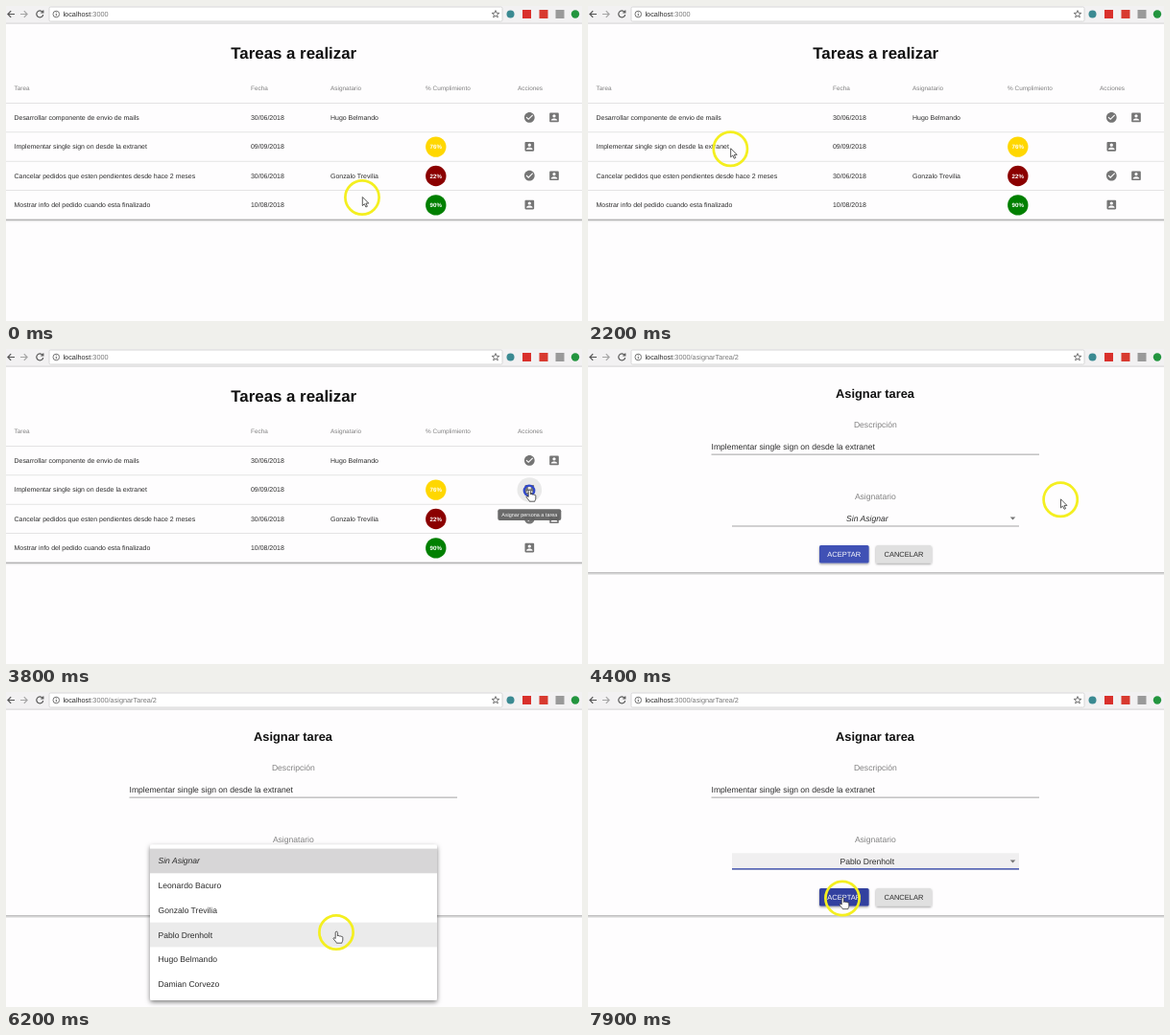
These frames come from a looping animation (600x329 px, 8000 ms). An HTML page:

```html
<!DOCTYPE html>
<html lang="es">
<head>
<meta charset="utf-8">
<title>Tareas</title>
<style>
html, body { margin: 0; width: 100%; height: 100%; overflow: hidden; background: #fefdfe; }
svg { display: block; }
text { font-family: "Liberation Sans", Arial, sans-serif; text-rendering: geometricPrecision; }
</style>
</head>
<body>
<svg id="stage" width="600" height="329" viewBox="0 0 600 329"></svg>
<script>
const LOOP = 8000;
const INDIGO = "#3f51b5";
const people = ["Leonardo Bacuro", "Gonzalo Trevilia", "Pablo Drenholt", "Hugo Belmando", "Damian Corvezo"];
const tasks = [
  { name: "Desarrollar componente de envio de mails", date: "30/06/2018", who: people[3] },
  { name: "Implementar single sign on desde la extranet", date: "09/09/2018", done: 76, color: "#ffd700" },
  { name: "Cancelar pedidos que esten pendientes desde hace 2 meses", date: "30/06/2018", who: people[1], done: 22, color: "#8b0000" },
  { name: "Mostrar info del pedido cuando esta finalizado", date: "10/08/2018", done: 90, color: "#008000" }
];

const text = (x, y, size, str, attrs = "") =>
  `<text x="${x}" y="${y}" font-size="${size}" fill="#2b2b2b" ${attrs}>${str}</text>`;
const middle = 'text-anchor="middle"';
const rect = (x, y, w, h, fill, attrs = "") =>
  `<rect x="${x}" y="${y}" width="${w}" height="${h}" fill="${fill}" ${attrs}/>`;
const circle = (x, y, r, fill, attrs = "") =>
  `<circle cx="${x}" cy="${y}" r="${r}" fill="${fill}" ${attrs}/>`;
const icon = (id, x, y) =>
  `<use href="#${id}" transform="translate(${x - 6.43} ${y - 6.43}) scale(.536)" fill="#757575"/>`;
const paperEdge = y => rect(0, y, 600, 1.5, "#b4b4b4") + rect(0, y + 1.5, 600, 1.2, "#e6e6e6");

const defs = `<defs>
  <filter id="shadow" x="-20%" y="-20%" width="140%" height="150%">
    <feDropShadow dx="0" dy="1.2" stdDeviation="1.1" flood-opacity=".4"/>
  </filter>
  <filter id="lift" x="-10%" y="-10%" width="120%" height="125%">
    <feDropShadow dx="0" dy="2" stdDeviation="2.4" flood-opacity=".5"/>
  </filter>
  <path id="check" d="M12 2C6.48 2 2 6.48 2 12s4.48 10 10 10 10-4.48 10-10S17.52 2 12 2zm-2 15l-5-5 1.41-1.41L10 14.17l7.59-7.59L19 8l-9 9z"/>
  <path id="person" d="M3 5v14c0 1.1.89 2 2 2h14c1.1 0 2-.9 2-2V5c0-1.1-.9-2-2-2H5c-1.11 0-2 .9-2 2zm12 4c0 1.66-1.34 3-3 3s-3-1.34-3-3 1.34-3 3-3 3 1.34 3 3zm-9 8c0-2 4-3.1 6-3.1s6 1.1 6 3.1v1H6v-1z"/>
</defs>`;

const star = Array.from({ length: 10 }, (_, i) => {
  const r = i % 2 ? 1.7 : 4, a = i * Math.PI / 5;
  return `${510 + r * Math.sin(a)},${8.6 - r * Math.cos(a)}`;
}).join(" ");

const browserBar = rect(0, 0, 600, 18, "#f2f1f2") + rect(0, 17.6, 600, 1, "#d3d2d3") +
  rect(45, 1, 472, 15, "#fff", 'rx="1.5" stroke="#cfcfcf" stroke-width=".8"') +
  `<g fill="none" stroke="#555" stroke-width="1.2">
    <path d="M9 8.5H2M5.2 5.2L1.9 8.5l3.3 3.3"/>
    <path d="M15 8.5h7M18.8 5.2l3.3 3.3-3.3 3.3" stroke="#a5a5a5"/>
    <path d="M38 6.2A3.5 3.5 0 1 0 38.7 9.2M38.8 4.4V7H36.2"/>
    <circle cx="52.3" cy="8.5" r="3.3" stroke-width=".8"/>
    <path d="M52.3 8v2.3M52.3 6.3v.9" stroke-width=".9"/>
    <polygon points="${star}" stroke-width=".8"/>
  </g>` +
  text(59.5, 11, 7.3, '<tspan>localhost</tspan><tspan fill="#777" id="path"></tspan>') +
  circle(525.5, 8.5, 4, "#3b8a92") + rect(538, 4, 9, 9, "#d9302c") + rect(555.5, 4, 9, 9, "#d83a30") +
  rect(572.5, 4, 9, 9, "#9a9a9a") + circle(593, 8.5, 4.2, "#23953f");

const columns = [[8.5, "Tarea"], [255, "Fecha"], [338, "Asignatario"], [437, "% Cumplimiento"], [533, "Acciones"]];

function taskRow(task, i) {
  const y = 116.4 + 30.4 * i;
  let out = rect(0, y - 15.4, 600, .8, "#dedede") +
    text(8.5, y + 2.3, 6.96, task.name) + text(255, y + 2.3, 6.96, task.date);
  if (task.who) out += text(338, y + 2.3, 6.96, task.who) + icon("check", 545.3, y) + icon("person", 571, y);
  else out += icon("person", 545.3, y);
  if (task.done) out += circle(447.8, y + .3, 10.7, task.color) +
    text(447.8, y + 2.4, 6.2, task.done + "%", middle + ' font-weight="bold" style="fill:#fff"');
  return out;
}

const listPage = `<g id="list">` +
  text(299.7, 55, 16.85, "Tareas a realizar", middle + ' font-weight="bold" style="fill:#111"') +
  columns.map(([x, label]) => text(x, 88.2, 6.43, label, 'style="fill:#808080"')).join("") +
  circle(545.3, 147, 12.8, "#e9e9e9", 'id="halo"') +
  tasks.map(taskRow).join("") + paperEdge(222.6) +
  `<g id="tip">` + rect(512.3, 167.2, 66, 11.8, "#616161", 'rx="2" opacity=".94"') +
  text(545.3, 175, 5.45, "Asignar persona a tarea", middle + ' style="fill:#fff"') + `</g></g>`;

const button = (id, x, w, fill, color, label) =>
  rect(x, 205, w, 18.6, fill, `id="${id}" rx="1.6" filter="url(#shadow)"`) +
  text(x + w / 2, 216.6, 7.5, label, `${middle} style="fill:${color}"`);

const itemTop = i => 163.6 + 25.7 * i;
const menu = `<g id="menu">` +
  rect(150, 159.5, 299, 162.5, "#fff", 'rx="2" filter="url(#lift)"') +
  rect(150, itemTop(0), 299, 25.7, "#d7d6d7") + rect(150, 0, 299, 25.7, "#ebebeb", 'id="hover"') +
  ["Sin Asignar", ...people].map((name, i) =>
    text(158.5, itemTop(i) + 15.8, 8.57, name, i ? "" : 'font-style="italic"')).join("") + `</g>`;

const formPage = `<g id="form">` +
  text(299, 51, 12.83, "Asignar tarea", middle + ' font-weight="bold" style="fill:#111"') +
  text(299.3, 81.8, 8.57, "Descripción", middle + ' style="fill:#808080"') +
  text(128.5, 104.6, 8.57, tasks[1].name) + rect(128.5, 109.7, 341.5, .8, "#8d8d8d") +
  text(299.3, 156.7, 8.57, "Asignatario", middle + ' style="fill:#808080"') +
  rect(150, 168.3, 299, 16.8, "#f0eff0", 'id="field"') + rect(150, 184.6, 299, .8, "#8d8d8d") +
  rect(0, 184.2, 0, 1.3, INDIGO, 'id="underline"') +
  text(290.8, 179.5, 8.57, "", middle + ' id="value"') +
  `<path d="M439.7 175.6h5.6l-2.8 2.8z" fill="#757575"/>` +
  button("accept", 241, 51.6, INDIGO, "#fff", "ACEPTAR") +
  button("cancel", 300, 57.8, "#e0e0e0", "#2b2b2b", "CANCELAR") +
  paperEdge(233.2) + menu + `</g>`;

const pointer = `<g id="pointer"><circle id="ring" fill="none"/>
  <g fill="#fff" stroke="#333" stroke-width=".8" stroke-linejoin="round">
    <path id="arrow" d="M.3-.5V8.6L2.4 6.7 3.9 10 5.4 9.3 3.9 6.1H6.8z"/>
    <path id="hand" transform="translate(.3 -.6)" d="M-1.1 7.2V.9a1.1 1.1 0 0 1 2.2 0V4.6a1 1 0 0 1 1.9.2a1 1 0 0 1 1.8.4a1 1 0 0 1 1.7.7V8.6c0 1.6-.9 1.8-.9 3.2H0C0 10.6-2.8 8.6-3.2 7.3c-.3-1 .9-1.5 2.1-.1z"/>
  </g></g>`;

document.getElementById("stage").innerHTML =
  defs + rect(0, 0, 600, 329, "#fefdfe") + listPage + formPage + browserBar + pointer;

const el = {};
document.querySelectorAll("[id]").forEach(node => el[node.id] = node);
const set = (node, attrs) => { for (const k in attrs) node.setAttribute(k, attrs[k]); };
const show = (node, on) => set(node, { visibility: on ? "inherit" : "hidden" });

const between = (t, a, b) => t >= a && t < b;
const ramp = (t, a, b) => Math.min(1, Math.max(0, (t - a) / (b - a)));
const smooth = p => p * p * (3 - 2 * p);
const easeOut = p => 1 - (1 - p) ** 2;

// time, x, y
const route = [
  [0, 371, 200], [500, 371, 200], [1400, 130, 132], [1750, 45, 149], [1950, 45, 149], [2700, 441, 150],
  [3000, 441, 150], [3400, 545, 148], [4150, 545, 148], [4800, 386, 176], [5400, 386, 176],
  [6000, 344, 251], [7150, 344, 251], [7700, 265, 215.5], [LOOP, 265, 215.5]
];
const clicks = [[3700, 3950], [5000, 5250], [6450, 6600]];

function position(t) {
  const i = route.findIndex(p => p[0] > t);
  const [t0, x0, y0] = route[i - 1], [t1, x1, y1] = route[i];
  const p = smooth(ramp(t, t0, t1));
  return [x0 + (x1 - x0) * p, y0 + (y1 - y0) * p];
}

function render(t) {
  const onForm = t >= 4050;
  show(el.list, !onForm);
  show(el.form, onForm);
  el.path.textContent = onForm ? ":3000/asignarTarea/2" : ":3000";

  set(el.halo, { opacity: ramp(t, 3300, 3420) });
  set(el.tip, { opacity: ramp(t, 3380, 3560) });

  const [x, y] = position(t);
  const chosen = t >= 6580;
  el.value.textContent = chosen ? people[2] : "Sin Asignar";
  set(el.value, { "font-style": chosen ? "normal" : "italic" });
  show(el.field, t >= 5040);
  const line = 299 * easeOut(ramp(t, 5050, 5250));
  set(el.underline, { x: 299.5 - line / 2, width: line });
  set(el.accept, { fill: t > 7560 ? "#303f9f" : INDIGO });

  const open = easeOut(ramp(t, 5230, 5450));
  const sx = .75 + .25 * open, sy = .56 + .44 * open;
  set(el.menu, {
    opacity: open * (1 - ramp(t, 6580, 6780)),
    transform: `translate(299.5 176.5) scale(${sx} ${sy}) translate(-299.5 -176.5)`
  });
  const row = Math.floor((y - itemTop(0)) / 25.7);
  show(el.hover, onForm && row > 0);
  set(el.hover, { y: itemTop(row) });

  const pressed = clicks.some(([a, b]) => between(t, a, b));
  const hand = between(t, 3360, 4050) || between(t, 4720, 7200) || t >= 7560;
  set(el.pointer, { transform: `translate(${x} ${y})` });
  set(el.ring, pressed
    ? { r: 5.3, stroke: "#3048cc", "stroke-width": 2.2 }
    : { r: 17.6, stroke: "#f4ef20", "stroke-width": 2.7 });
  show(el.arrow, !hand);
  show(el.hand, hand);
}

const start = performance.now();
function frame(now) {
  render(Math.max(0, now - start) % LOOP);
  requestAnimationFrame(frame);
}
render(0);
requestAnimationFrame(frame);
</script>
</body>
</html>
```
